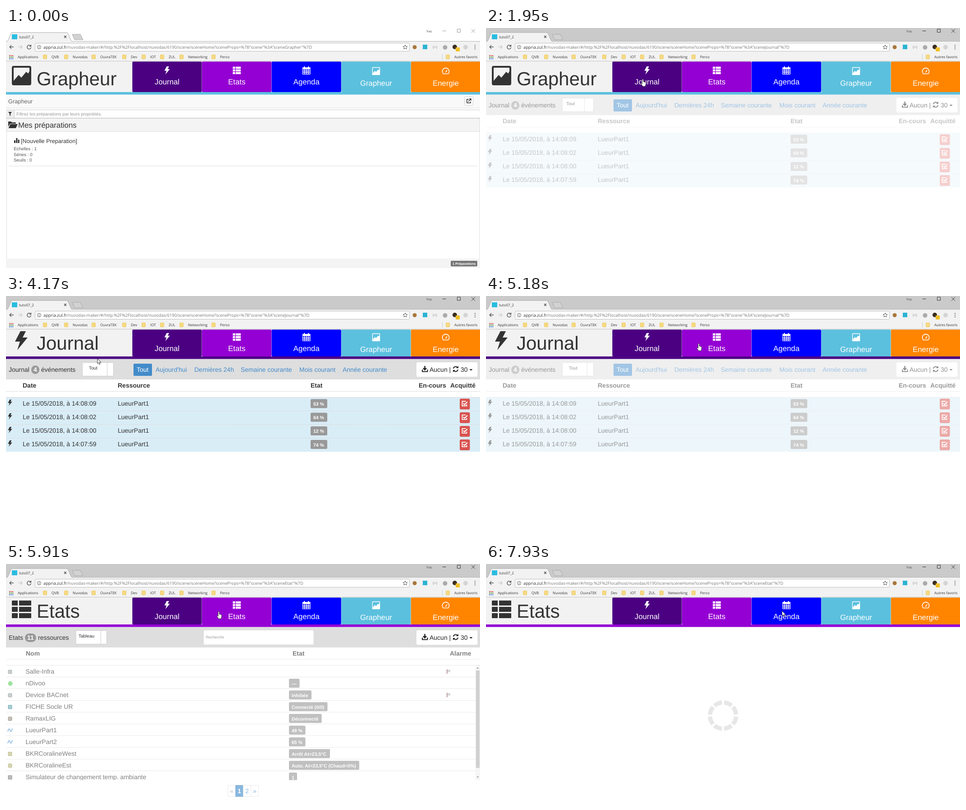
Animation of 1052x532 px, one loop 8 s. Source, as an HTML page:

```html
<!DOCTYPE html>
<html lang="fr">
<head>
<meta charset="utf-8">
<title>tuto07_2</title>
<style>
html, body { margin: 0; width: 100%; height: 100%; overflow: hidden; background: #fff; }
svg { display: block; width: 1052px; height: 532px; font-family: "Liberation Sans", Arial, sans-serif; }
text { white-space: pre; text-rendering: geometricPrecision; }
.ui { font-family: "Open Sans", "Noto Sans", sans-serif; }
.a { animation: 8s step-end infinite; }

.bar { animation-name: wake; }
.buttons { animation-name: wakeButtons; }
.grapher { animation-name: grapher; }
.url1 { animation-name: url1; }
.url2 { animation-name: url2; }
.url3 { animation-name: url3; }
.head1 { animation-name: head1; }
.head2 { animation-name: head2; }
.head3 { animation-name: head3; }
.journal { animation-name: journal; }
.jbar { animation-name: jbar; }
.jtable { animation-name: jtable; }
.select { animation-name: select; }
.etats { animation-name: etats; }
.ebar { animation-name: ebar; }
.etable { animation-name: etable; }
.spinner { animation-name: spinner; }
.cursor { animation-name: move; }
.hand { animation-name: hand; }
.arrow { animation-name: arrow; }

@keyframes wake { 0% { fill: #fff } 17.25%, 100% { fill: #cacaca } }
@keyframes wakeButtons { 0% { stroke: #999 } 17.25%, 100% { stroke: #333 } }
@keyframes grapher { 0% { opacity: 1 } 17.25% { opacity: .5 } 18.28%, 100% { opacity: 0 } }
@keyframes url1 { 0% { opacity: 1 } 22.39%, 100% { opacity: 0 } }
@keyframes url2 { 0% { opacity: 0 } 22.39% { opacity: 1 } 71%, 100% { opacity: 0 } }
@keyframes url3 { 0% { opacity: 0 } 71%, 100% { opacity: 1 } }
@keyframes head1 { 0% { opacity: 1 } 26.5%, 100% { opacity: 0 } }
@keyframes head2 { 0% { opacity: 0 } 26.5% { opacity: 1 } 71.96%, 100% { opacity: 0 } }
@keyframes head3 { 0% { opacity: 0 } 71.96%, 100% { opacity: 1 } }
@keyframes journal {
  0% { opacity: 0; transform: translateY(8px) }
  23.41% { opacity: 1; transform: translateY(8px) }
  26.5% { opacity: 1; transform: none }
  64.75% { opacity: .5; transform: none }
  65.7%, 100% { opacity: 0; transform: none }
}
@keyframes jbar { 0% { opacity: .2 } 24.35% { opacity: .5 } 25.48% { opacity: .8 } 26.5%, 100% { opacity: 1 } }
@keyframes jtable { 0% { opacity: .08 } 24.35% { opacity: .28 } 25.48% { opacity: .65 } 26.5%, 100% { opacity: 1 } }
@keyframes select { 0% { transform: translateX(-6px) } 26.5%, 100% { transform: none } }
@keyframes etats { 0% { opacity: 0 } 71.96% { opacity: 1 } 96.125% { opacity: .5 } 97.1%, 100% { opacity: 0 } }
@keyframes ebar { 0% { opacity: .3 } 72.9% { opacity: .7 } 73.8%, 100% { opacity: 1 } }
@keyframes etable { 0% { opacity: .1 } 72.9% { opacity: .35 } 73.8% { opacity: .62 } 74.8% { opacity: .85 } 75.75%, 100% { opacity: 1 } }
@keyframes spinner {
  0% { opacity: 0; transform: translate(526px, 340px) }
  18.28% { opacity: 1; transform: translate(526px, 340px) rotate(0deg); animation-timing-function: steps(4) }
  22.39% { opacity: 1; transform: translate(526px, 340px) rotate(45deg) }
  23.41% { opacity: 0; transform: translate(526px, 336px) }
  65.7% { opacity: 1; transform: translate(526px, 336px) rotate(0deg); animation-timing-function: steps(3) }
  68.875% { opacity: 1; transform: translate(526px, 336px) rotate(45deg) }
  71.96% { opacity: 0; transform: translate(526px, 336px) }
  97.1% { opacity: 1; transform: translate(526px, 336px) rotate(0deg); animation-timing-function: steps(2) }
  99.1%, 100% { opacity: 1; transform: translate(526px, 336px) rotate(45deg) }
}
@keyframes move {
  0% { transform: translate(1070px, 560px) }
  .875% { transform: translate(872px, 519px) }
  1.84% { transform: translate(650px, 385px) }
  2.8% { transform: translate(462px, 250px) }
  3.75% { transform: translate(389px, 192px) }
  5.875% { transform: translate(389px, 192px); animation-timing-function: steps(4, jump-both) }
  10.375% { transform: translate(346px, 114px) }
  12.375% { transform: translate(348px, 113px) }
  30.85% { transform: translate(290px, 114px) }
  31.93% { transform: translate(232px, 104px) }
  33% { transform: translate(185px, 97px) }
  34% { transform: translate(150px, 95px) }
  35.1% { transform: translate(124px, 97px) }
  36.1% { transform: translate(106px, 101px) }
  37.2% { transform: translate(95px, 106px) }
  38.25% { transform: translate(91px, 112px) }
  39.3% { transform: translate(95px, 118px) }
  40.375% { transform: translate(101px, 122px) }
  41.5% { transform: translate(101px, 122px); animation-timing-function: steps(10, jump-both) }
  51.25% { transform: translate(188px, 138px) }
  52.1% { transform: translate(203px, 139px) }
  56.125% { transform: translate(203px, 139px); animation-timing-function: steps(7, jump-both) }
  62.625% { transform: translate(472px, 105px) }
  86.25% { transform: translate(472px, 105px); animation-timing-function: steps(8, jump-both) }
  94.25%, 100% { transform: translate(657px, 104px) }
}
@keyframes hand {
  0% { opacity: 0 } 9.2% { opacity: 1 } 31.93% { opacity: 0 }
  57.95% { opacity: 1 } 97.1%, 100% { opacity: 0 }
}
@keyframes arrow {
  0% { opacity: 1 } 9.2% { opacity: 0 } 31.93% { opacity: 1 }
  57.95% { opacity: 0 } 97.1%, 100% { opacity: 1 }
}
</style>
</head>
<body>
<svg id="stage" viewBox="0 0 1052 532"></svg>
<script>
const text = (x, y, size, s, fill = '#333', more = '') =>
  `<text x="${x}" y="${y}" font-size="${size}" fill="${fill}" ${more}>${s}</text>`;
const rect = (x, y, w, h, fill, rx = 0, stroke = 'none') =>
  `<rect x="${x}" y="${y}" width="${w}" height="${h}" fill="${fill}" rx="${rx}" stroke="${stroke}"/>`;
const line = (d, stroke = '#ddd', width = 1) =>
  `<path d="${d}" fill="none" stroke="${stroke}" stroke-width="${width}"/>`;
const dot = (x, y, r, fill) => `<circle cx="${x}" cy="${y}" r="${r}" fill="${fill}"/>`;
const icon = (id, x, y, w, h, color = '#333') =>
  `<use href="#${id}" x="${x}" y="${y}" width="${w}" height="${h}" color="${color}"/>`;
const anim = (name, ...parts) => `<g class="a ${name}">${parts.join('')}</g>`;
const BOLD = 'font-weight="bold"', MID = 'text-anchor="middle"', UI = 'class="ui"';
const LINK = '#428bca';

const symbol = (id, w, h, body) =>
  `<symbol id="${id}" viewBox="0 0 ${w} ${h}" fill="currentColor">${body}</symbol>`;
const pen = (d, width) => line(d, 'currentColor', width);
const defs = '<defs>' +
  symbol('bolt', 28, 42, '<path d="M12 0H24L17 14H28L5 42 11 23H0Z"/>') +
  symbol('list', 43, 39, [0, 14, 28].map(y =>
    `<path d="M1 ${y}h12v11H1a1 1 0 0 1-1-1v-9a1 1 0 0 1 1-1zM16 ${y}h26a1 1 0 0 1 1 1v9a1 1 0 0 1-1 1H16z"/>`).join('')) +
  symbol('calendar', 16, 16, '<path d="M0 2h16v4H0z"/>' +
    pen('M.6 6V15.4H15.4V6M4.3 6v9M8 6v9M11.7 6v9M1 9h14M1 12h14', 1.2) + pen('M4 0v3M12 0v3', 2)) +
  symbol('image', 43, 43, '<path fill-rule="evenodd" d="M4 0H39a4 4 0 0 1 4 4V39a4 4 0 0 1-4 4H4a4 4 0 0 1-4-4V4a4 4 0 0 1 4-4zM4 4V33L15 20 21 26 32 13 36 17 39 12V4z"/>') +
  symbol('gauge', 18, 14, pen('M3.5 13A7.6 7.6 0 1 1 14.5 13Z', 1.7) + pen('M8.5 10L12 5', 1.7)) +
  symbol('check', 14, 14, pen('M11.5 8v3.5h-10v-10h8', 1.8) + pen('M4 6l2.7 2.7L13 2.5', 2.2)) +
  symbol('folder', 20, 15, '<path d="M0 12V1h6l1.5 2H16v2.5H4zM4.5 6.5H20L16 15H0.5z"/>') +
  '<clipPath id="rows"><path d="M0 140H1052V479H0z"/></clipPath></defs>';

// Browser window
const bookmarks = [['QVB', 101], ['Nuvodas', 148], ['OuvraTEK', 209], ['Dev', 277], ['IOT', 320],
  ['ZUL', 361], ['Networking', 404], ['Perso', 475], ['Autres favoris', 995]];
const url = (n, scene) => text(83, 45.6, 9.3,
  `<tspan fill="#333">appria.zul.fr</tspan>/nuvodas-maker/#/http:%2F%2Flocalhost/nuvodas/6190/scene/sceneHome?sceneProps=%7B"scene"%3A"scene${scene}"%7D`,
  '#777', `class="ui a url${n}"`);

function browser() {
  let s = '<rect class="a bar" width="1052" height="30"/>' + rect(0, 29, 1052, 45, '#f2f2f2') +
    line('M0 29.5H1052', '#b4b4b4') +
    '<path d="M2 30C6 29 10 10 13 10H135C139 10 143 29 147 30" fill="#f2f2f2" stroke="#aaa"/>' +
    '<path d="M147 14H165L171 26H152Z" fill="#d2d2d2" stroke="#aaa"/>' +
    rect(13, 14, 12, 11, '#2bbde0') + text(29, 22.6, 8, 'tuto07_2', '#333', UI) +
    line('M129 17l5 5M134 17l-5 5', '#444', 1.1) + text(933, 9.8, 7.4, 'Yvo', '#444', UI) +
    anim('buttons', '<path d="M968.5 6.5h8M1001.5 2.5h7v7h-7zM1033 2.5l8 8M1041 2.5l-8 8" fill="none"/>') +
    line('M17 42H8M12 38l-4 4 4 4', '#555', 1.4) + line('M27 42h9M32 38l4 4-4 4', '#ccc', 1.4) +
    line('M54.5 39.5A4.3 4.3 0 1 0 55.5 43M55.5 37v3.5H52', '#555', 1.4) +
    rect(64.5, 33.5, 831, 18, '#fff', 2, '#bbb') +
    line('M77.5 42.5a4 4 0 1 1-8 0a4 4 0 1 1 8 0M73.5 42v3M73.5 40v1', '#555') +
    url(1, 'Grapher') + url(2, 'Journal') + url(3, 'Etat') +
    line('M886 37.5l1.4 3.2 3.5.3-2.7 2.3.9 3.5-3.1-1.9-3.1 1.9.9-3.5-2.7-2.3 3.5-.3z', '#555') +
    dot(907, 42.5, 4.5, '#a8783c') + rect(925, 37, 10, 10, '#2ab4d4') +
    text(952, 45, 8, '(=)', '#888', `${UI} ${MID}`) + dot(974.5, 43, 5, '#aaa') +
    dot(996, 42, 5, '#3a2d20') + rect(998, 43, 9, 9, '#f2c02c', 1) + dot(1020, 42.5, 5, '#d4d4d4');
  for (const y of [38.5, 42.5, 46.5]) s += dot(1041, y, 1.1, '#555');
  for (let i = 0; i < 9; i++)
    s += rect(7 + i % 3 * 3.5, 60 + (i / 3 | 0) * 3.5, 2.3, 2.3, ['#d9534f', '#5a9a4a', '#4a7fd0'][i / 3 | 0]);
  s += text(26, 66.6, 8, 'Applications', '#333', UI) + line('M968.5 58v12', '#ccc');
  for (const [name, x] of bookmarks)
    s += rect(x - 18.5, 59.5, 8, 9, '#f6da84', 1, '#ecc860') + text(x, 66.6, 8, name, '#333', UI);
  return s + line('M0 73.5H1052', '#c4c4c4');
}

// Page headers
const tabs = [['Journal', 'bolt', '#4b0082', 0], ['Etats', 'list', '#9400d3', 0], ['Agenda', 'calendar', '#00f', 0],
  ['Grapheur', 'image', '#5bc0de', 1], ['Energie', 'gauge', '#ff8400', 1]];

function header(name, tab, box, tall) {
  const h = tall ? 68 : 60, [title, glyph, color] = tabs[tab];
  let s = rect(0, 74, 1052, h, '#f2f2f2') + rect(0, 74 + h, 1052, 5.6, color) +
    icon(glyph, ...box) + text(68, tall ? 127 : 119, 42, title);
  tabs.forEach(([label, id, fill, low], i) => {
    const x = 280.4 + 154.6 * i, cx = x + 77.2;
    const drop = tall ? 3 + low : 0;
    s += rect(x, 74.5, 154.2, h - .5, fill, 2) +
      icon(id, cx - 9, 82 + drop + low * .5, 18, 18, '#fff') +
      text(cx, 122.3 + drop + low * 1.2, 16.8, label, '#fff', MID);
  });
  return anim(name, s);
}

// Page contents
function grapher() {
  return anim('grapher',
    rect(0, 148, 1052, 29, '#f9f9f9'), text(5, 166.5, 12.8, 'Grapheur', '#666'),
    line('M0 177.5H1052'), rect(1017.5, 152.5, 19, 19, '#fff', 2, '#ccc'),
    line('M1027 158h-4v8h8v-3M1026 163l5.5-5.5M1028 157h4v4', '#333', 1.6),
    rect(-.5, 181.5, 1053, 18, '#fff', 0, '#ccc'), rect(0, 182, 18, 17, '#eee'), line('M18.5 182v17', '#ccc'),
    '<path d="M5 186h8l-3 4v5l-2-1.5V190z" fill="#333"/>',
    text(23, 194, 9.85, 'Filtrez les préparations par leurs propriétés.', '#999'),
    rect(1.5, 200.5, 1050, 29, '#f4f4f4', 0, '#ddd'), line('M1.5 230V511M1051.5 230V511'),
    icon('folder', 5, 206, 21, 16), text(27, 221, 16.8, 'Mes préparations'),
    rect(18, 249, 3, 6, '#333'), rect(22.3, 244, 3, 11, '#333'), rect(26.6, 247.5, 3, 7.5, '#333'),
    text(33, 254.5, 12.63, '[Nouvelle Preparation]'),
    ['Echelles : 1', 'Séries : 0', 'Seuils : 0'].map((s, i) => text(17, 270.8 + 12.7 * i, 9.87, s, '#555')).join(''),
    line('M6 306H1046'), rect(0, 511, 1052, 21, '#f4f4f4'),
    rect(987, 516, 59, 12.5, '#777', 2), text(991, 525, 7.4, '1 Préparations', '#fff', BOLD));
}

const count = (x, w, n) => rect(x, 154, w, 19, '#999', 9.5) + text(x + w / 2, 168.4, 14, n, '#fff', `${BOLD} ${MID}`);
const refresh = rect(911, 147, 135.5, 32, '#fff', 3) +
  line('M929.5 155v8M926 160l3.5 3.5 3.5-3.5', '#222', 2.5) + line('M924 163v4.5h11.5V163', '#222', 2) +
  text(940, 167.5, 14, 'Aucun |', '#222') + line('M993 161a5 5 0 0 1 9-2.5M1003 163a5 5 0 0 1-9 2.5', '#222', 2) +
  '<path d="M1004 155v5h-5zM992 169v-5h5z" fill="#222"/>' +
  text(1009, 167.5, 14, '30', '#222') + '<path d="M1028.5 162h7l-3.5 3.5z" fill="#222"/>';
const heads = list => list.map(([x, s]) => text(x, 203.2, 14, s, '#333', BOLD)).join('') +
  line('M0 211.5H1052M0 224.5H1052');
const badge = (x, y, w, s) => rect(x, y, w, 20, '#999', 2.5) + text(x + 6, y + 14.4, 10.5, s, '#fff', BOLD);

function journal() {
  const links = [["Aujourd'hui", 332], ['Dernières 24h', 418], ['Semaine courante', 521], ['Mois courant', 651], ['Année courante', 747]];
  const events = [['09', 53], ['02', 64], ['00', 12], ['59', 74]];
  const rows = events.map(([sec, level], i) => {
    const y = 224.5 + 30.2 * i;
    return rect(0, y, 1052, 30.2, '#d9edf7') + line(`M0 ${y}H1052`) + icon('bolt', 4, y + 5, 10, 14) +
      text(37, y + 18, 14, `Le 15/05/2018, à 14:0${i < 3 ? 8 : 7}:${sec}`) + text(248, y + 18, 14, 'LueurPart1') +
      badge(676, y + 4, 37, level + ' %') + rect(1007, y + 3, 22.5, 24, '#d9534f', 3) +
      icon('check', 1011, y + 7.5, 14, 14, '#fff');
  }).join('');
  return anim('journal',
    anim('jbar', rect(0, 140, 1052, 45, '#dedede'), text(6, 167.5, 14, 'Journal'), count(56, 18, 4),
      text(78, 167.5, 14, 'événements'), rect(169.5, 147.5, 69, 30, '#fff', 2, '#ccc'),
      anim('select', line('M224.5 148v30', '#ccc'), text(184, 162.5, 10, 'Tout')),
      rect(283, 150, 41, 27, LINK, 2), text(290, 168, 14, 'Tout', '#fff'),
      links.map(([s, x]) => text(x, 168, 14, s, LINK)).join(''), refresh),
    anim('jtable', heads([[37, 'Date'], [248, 'Ressource'], [676, 'Etat'], [916, 'En-cours'], [986, 'Acquitté']]), rows));
}

function etats() {
  const grey = '#8a9296', teal = '#3d8f9c', wave = '#2f7fc8', olive = '#a5a35a';
  const items = [['Salle-Infra', grey], ['nDivoo', '#5fd35f', '—', 23.5], ['Device BACnet', grey, 'Inhibée', 50],
    ['FICHE Socle UR', teal, 'Connecté (0/0)', 85.5], ['RamaxLIG', '#7c6f5a', 'Déconnecté', 72.5],
    ['LueurPart1', wave, '49 %', 36.5], ['LueurPart2', wave, '65 %', 36.5],
    ['BKRCoralineWest', olive, 'Arrêt At=23,5°C', 91], ['BKRCoralineEst', olive, 'Auto. At=23,5°C (Chaud=0%)', 156],
    ['Simulateur de changement temp. ambiante', '#666', '1', 18]];
  const rows = items.map(([name, color, state, w], i) => {
    const y = 224.5 + 26 * i;
    const mark = color === wave ? line(`M4 ${y + 17}q2.5-10 5-3t5-4`, wave, 1.5)
      : i === 1 ? dot(9.5, y + 14.5, 5, color)
      : rect(4.5, y + 10, 9, 9, color, i % 2 ? 0 : 2) + line(`M6 ${y + 13}h6M6 ${y + 16}h6`, '#e8eeee');
    return mark + text(43.5, y + 18, 14, name) + line(`M0 ${y + 26}H1042`) +
      (state ? badge(628, y + 3.8, w, state) : '') +
      (i === 0 || i === 2 ? rect(978, y + 9, 1.5, 10, '#733') + rect(980, y + 10, 6, 5, '#bbb') : '');
  }).join('');
  const pages = ['«', '1', '2', '»'].map((s, i) =>
    rect(492.5 + 17 * i, 490.5, 17, 25, i === 1 ? LINK : '#fff', 0, i === 1 ? LINK : '#ddd') +
    text(501 + 17 * i, 508, 14, s, ['#999', '#fff', LINK, LINK][i], MID + (i === 1 ? ' ' + BOLD : ''))).join('');
  return anim('etats',
    anim('ebar', rect(0, 140, 1052, 45, '#dedede'), text(6, 167.5, 14, 'Etats'), count(42, 25, 11),
      text(71, 167.5, 14, 'ressources'), rect(155, 147.5, 68.5, 30, '#fff', 2, '#ccc'), line('M210.5 148v30', '#ccc'),
      text(161, 162.5, 10, 'Tableau'), rect(439, 147, 243.5, 31.5, '#fff', 2), text(443.5, 165, 8.4, 'Recherche', '#999'), refresh),
    anim('etable', heads([[44, 'Nom'], [636, 'Etat'], [985, 'Alarme']]), `<g clip-path="url(#rows)">${rows}</g>`,
      rect(1042, 225, 10, 254, '#f1f1f1'), rect(1043, 236, 8, 216, '#b4b4b4'),
      '<path d="M1044.5 232h5l-2.5-3zM1044.5 471h5l-2.5 3z" fill="#555"/>', pages));
}

const spinner = anim('spinner',
  '<circle r="29" fill="none" stroke="#e7e7e7" stroke-width="9.5" pathLength="8" stroke-dasharray=".8 .2" stroke-dashoffset="-.1"/>');
const cursor = anim('cursor',
  '<g fill="#fff" stroke="#222" stroke-width=".9" stroke-linejoin="round">' +
  '<path class="a arrow" d="M0 0V11L2.6 8.6 4.3 12.7 6 12 4.3 8H8Z"/>' +
  '<path class="a hand" d="M-1.2 9V1.5a1.3 1.3 0 0 1 2.6 0V6l4.2 1.2a1.5 1.5 0 0 1 1.1 1.5V12L5.5 16.5H0L-3.7 11a1 1 0 0 1 1.6-1.2L-1.2 11Z"/></g>');

document.getElementById('stage').innerHTML = defs + rect(0, 0, 1052, 532, '#fff') +
  grapher() + journal() + etats() + spinner +
  header('head1', 3, [13, 84, 43, 43], true) + header('head2', 0, [20, 78, 28, 42]) + header('head3', 1, [13, 81, 43, 39]) +
  browser() + cursor;
</script>
</body>
</html>
```
